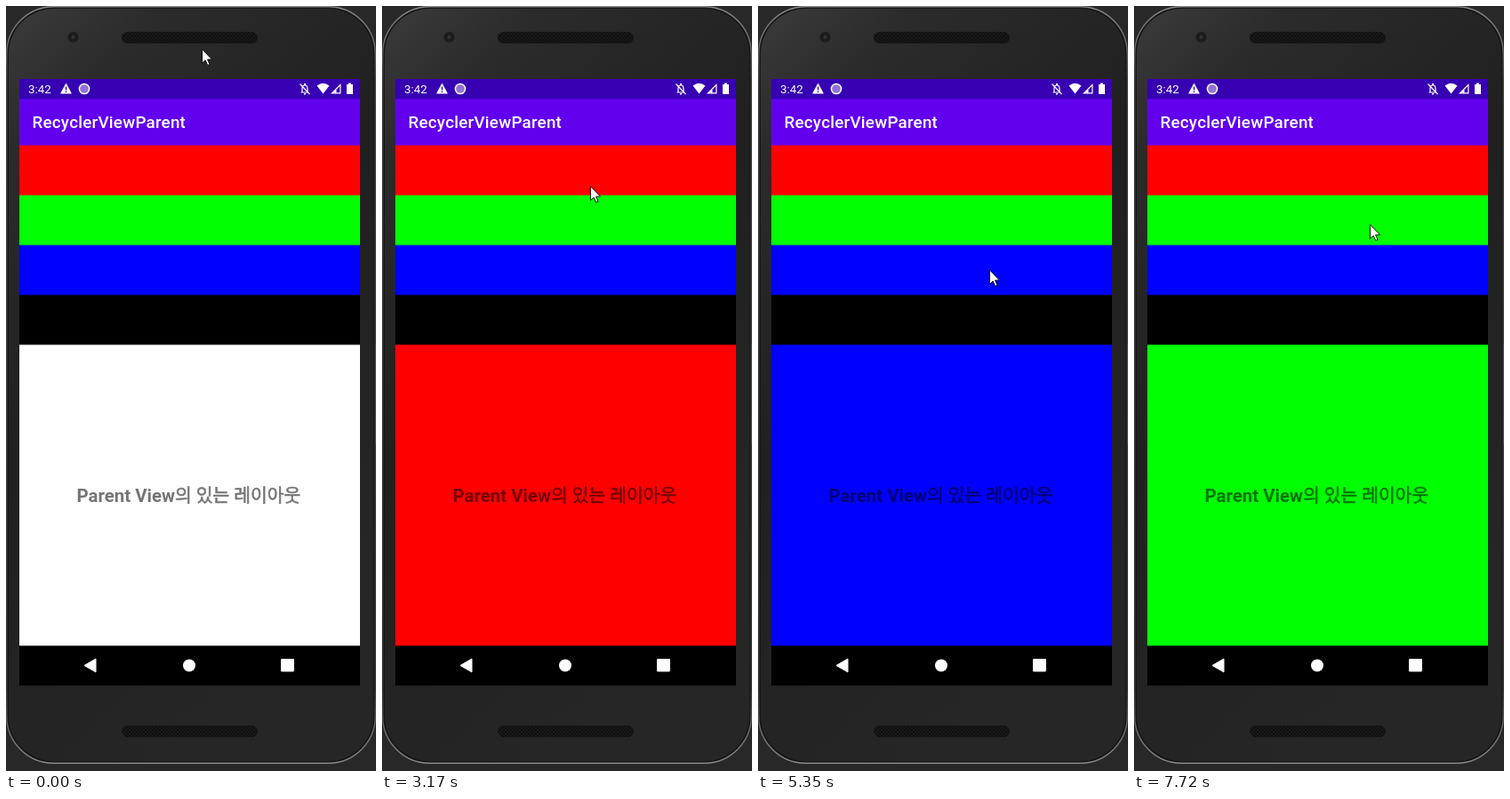
An HTML page that plays this animation: 416 px wide and 859 px high, repeating every 8 s.

```html
<!DOCTYPE html>
<html lang="ko">
<head>
<meta charset="utf-8">
<title>RecyclerViewParent</title>
<style>
html, body { margin: 0; width: 100%; height: 100%; overflow: hidden; background: #282828; }
svg { display: block; width: 100vw; height: 100vh; }
text { font-family: Roboto, "Noto Sans CJK KR", "Noto Sans CJK", sans-serif; }
</style>
</head>
<body>
<svg viewBox="0 0 416 859">
  <defs>
    <linearGradient id="body" x1="0" y1="0" x2=".45" y2="1">
      <stop offset="0" stop-color="#3b3b3b"/>
      <stop offset=".16" stop-color="#2b2b2b"/>
      <stop offset=".5" stop-color="#202020"/>
      <stop offset="1" stop-color="#262626"/>
    </linearGradient>
    <linearGradient id="rim" x1="0" y1="0" x2="0" y2="1">
      <stop offset="0" stop-color="#8a8a8a"/>
      <stop offset=".1" stop-color="#484848"/>
      <stop offset=".9" stop-color="#3c3c3c"/>
      <stop offset="1" stop-color="#8a8a8a"/>
    </linearGradient>
    <pattern id="mesh" width="4" height="4" patternUnits="userSpaceOnUse">
      <circle cx="1" cy="1" r=".8" fill="#262626"/>
      <circle cx="3" cy="3" r=".8" fill="#262626"/>
    </pattern>
    <g id="grille">
      <rect width="153" height="13" rx="6.5" fill="#0f0f0f"/>
      <rect width="153" height="13" rx="6.5" fill="url(#mesh)"/>
    </g>
  </defs>

  <rect width="416" height="859" fill="#282828"/>
  <rect x=".75" y=".75" width="414.5" height="849.5" rx="53" fill="#161616" stroke="url(#rim)" stroke-width="1.5"/>
  <rect x="3" y="3" width="410" height="845" rx="51" fill="url(#body)"/>
  <path d="M415.500 380V493" stroke="#505050"/>
  <circle cx="75.500" cy="35" r="6" fill="#1c1c1c"/>
  <circle cx="75.500" cy="35" r="2" fill="#343638"/>
  <use href="#grille" x="130" y="29"/>
  <use href="#grille" x="130" y="808"/>

  <rect x="15" y="82" width="383" height="681"/>
  <rect x="15" y="82" width="383" height="60" fill="#3700b3"/>
  <rect x="15" y="104.400" width="383" height="60" fill="#6200ee"/>
  <g id="rows"></g>
  <rect id="panel" x="15" y="380.400" width="383" height="337.900"/>

  <g fill="#fff">
    <text x="25" y="98" font-size="13.4">3:42</text>
    <path fill-rule="evenodd" d="M67.500 86.500 74 98.500H61ZM66.800 90.500V94.500H68.200V90.500ZM66.800 95.600V97H68.200V95.600Z"/>
    <circle cx="88" cy="93" r="5.600" fill-opacity=".45" stroke="#fff" stroke-width="1.500"/>
    <path d="M331.500 97H340.500M333 97V92.500Q333 89 336 89T339 92.500V97M330.500 87.500 341.500 99" fill="none" stroke="#fff" stroke-width="1.200"/>
    <path d="M335 87H337V89H335ZM335 98H337V99.500H335Z"/>
    <path d="M349.500 89.500Q356.500 84 363.500 89.500L356.500 98.500Z"/>
    <path d="M376.500 87V98.500H365Z"/>
    <path d="M375.300 90V97.300H371.500V93.800Z" fill="#3700b3"/>
    <path d="M383 88H385V86.500H388V88H390V99H383Z"/>
    <text x="29.500" y="137" font-size="18.8" font-weight="500" letter-spacing=".24">RecyclerViewParent</text>
    <path d="M88 740.500 101 733V748Z" stroke="#fff" stroke-linejoin="round"/>
    <circle cx="206" cy="740.500" r="7"/>
    <rect x="309" y="733" width="15" height="14.500" rx="1.200"/>
  </g>

  <text x="79.500" y="557" font-size="20.4" font-weight="700" opacity=".54">Parent View<tspan font-weight="400" stroke="#000" stroke-width=".6">의 있는 레이아웃</tspan></text>

  <circle id="tap" r="12" fill="#828187"/>
  <path id="cursor" d="M.500 .500V16.300L4.200 12.900 6.700 18.500 9 17.500 6.600 12H11.500Z" stroke="#000" stroke-width=".9"/>
</svg>
<script>
const LOOP = 8000, TICK = 70, HOLD = 130;
const COLORS = ["#f00", "#0f0", "#00f", "#000"];
const ROW_TOP = 156.5, ROW_HEIGHT = 55.97;
const find = id => document.getElementById(id);
const rows = find("rows"), panel = find("panel"), tap = find("tap"), cursor = find("cursor");

// Each glide runs to a point; bow bends its path sideways.
const home = { x: 220, y: 48 };
const glides = [
  { start: 450, end: 1220, x: 224, y: 219, bowX: 18 },
  { start: 1490, end: 1700, x: 236, y: 248 },
  { start: 2620, end: 2900, x: 234, y: 202 },
  { start: 3370, end: 3790, x: 239, y: 243, bowY: 44 },
  { start: 4200, end: 4740, x: 260, y: 296 },
  { start: 5530, end: 6020, x: 264, y: 353 },
  { start: 6570, end: 7320, x: 265, y: 245, bowX: 3 }
];
const taps = [
  { at: 2970, row: 0 },
  { at: 3940, row: 1 },
  { at: 5220, row: 2 },
  { at: 6170, row: 3, lag: TICK },
  { at: 7390, row: 1, lag: TICK }
];

COLORS.forEach((color, i) => {
  const row = document.createElementNS("http://www.w3.org/2000/svg", "rect");
  const box = { x: 15, y: ROW_TOP + i * ROW_HEIGHT, width: 383, height: ROW_HEIGHT + 1, fill: color };
  for (const key in box) row.setAttribute(key, box[key]);
  rows.append(row);
});

const easeOut = u => 1 - (1 - u) ** 1.6;

function cursorAt(t) {
  const i = glides.findLastIndex(g => t >= g.start);
  if (i < 0) return home;
  const from = glides[i - 1] || home;
  const { start, end, x, y, bowX = 0, bowY = 0 } = glides[i];
  const gaps = Math.round((end - start) / TICK);
  const step = Math.floor((t - start) / (end - start) * gaps + 1e-6);
  const u = Math.min(1, (step + 1) / (gaps + 1));
  const e = easeOut(u), bend = Math.sin(Math.PI * u);
  return {
    x: Math.round(from.x + (x - from.x) * e + bowX * bend),
    y: Math.round(from.y + (y - from.y) * e + bowY * bend)
  };
}

function draw(t) {
  const { x, y } = cursorAt(t);
  const down = taps.some(p => t >= p.at && t < p.at + HOLD);
  const chosen = taps.findLast(p => t >= p.at + HOLD + (p.lag || 0));
  panel.setAttribute("fill", chosen ? COLORS[chosen.row] : "#fff");
  tap.setAttribute("visibility", down ? "visible" : "hidden");
  for (const part of [tap, cursor]) part.setAttribute("transform", `translate(${x} ${y})`);
  cursor.setAttribute("fill", down ? "#ffff9c" : "#fff");
}

const began = performance.now();
function tick() {
  draw((performance.now() - began) % LOOP);
  requestAnimationFrame(tick);
}
tick();
</script>
</body>
</html>
```
